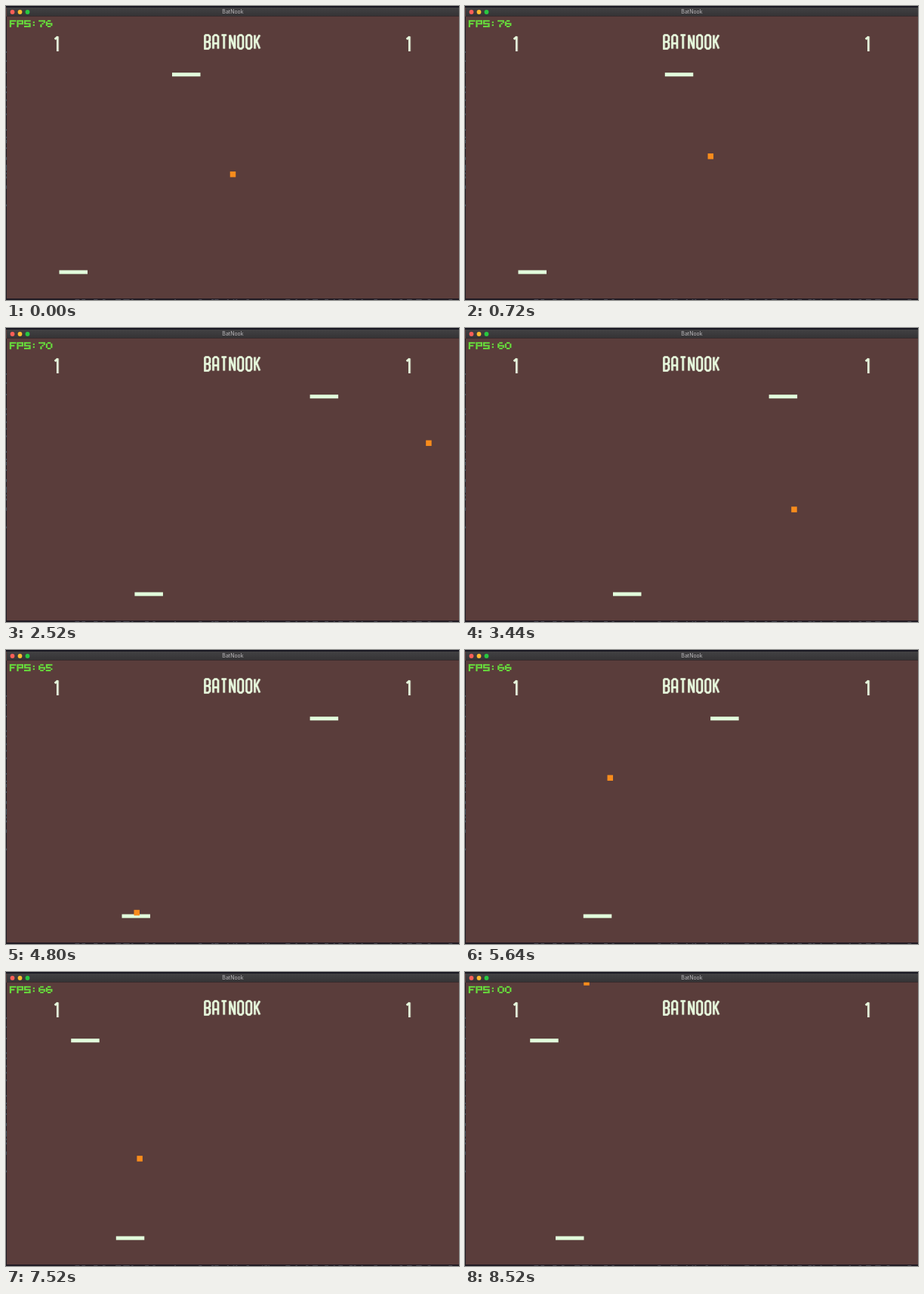
Recreate the animation shown at these times as an HTML page with a canvas. Size 600x389 px, loop 8.6 s.

```html
<!DOCTYPE html>
<html lang="en">
<head>
<meta charset="utf-8">
<title>BatNook</title>
<style>
  html, body { margin: 0; width: 100%; height: 100%; overflow: hidden; background: #5a3d3b; }
  canvas { display: block; width: 100vw; height: 100vh; }
</style>
</head>
<body>
<canvas id="stage" width="600" height="389" role="img" aria-label="BatNook, score 1 to 1"></canvas>
<script>
const ctx = document.getElementById('stage').getContext('2d');
const LOOP = 8600;
const PALE = '#e2ffdc', ORANGE = '#f88c1c', GREEN = '#69f43c', BROWN = '#5a3d3b';

// Keys: [time, value, ...]
const ballKeys = [
  [0, 300.5, 222.7], [440, 300.5, 222.7], [1320, 378.2, 148],
  [1913, 429, 97], [2520, 559.7, 152.2], [2690, 596, 168.5],
  [3440, 436.2, 240], [3640, 388, 260], [4800, 173.2, 347.8],
  [5981, 200, 97], [6480, 193.3, 203.2], [7096, 184, 346],
  [8520, 161, 14], [8600, 161, 14]
];
const topKeys = [
  [0, 220], [440, 220], [1320, 360.3], [1440, 360.3], [1800, 402.6],
  [5440, 402.6], [5960, 202.2], [6900, 202.2], [7500, 86.2]
];
const bottomKeys = [
  [0, 70.5], [2100, 70.5], [2520, 170.2], [2630, 196], [3900, 196],
  [4300, 153.5], [5600, 153.5], [5900, 177.6], [7300, 177.6], [7700, 120]
];
const fpsKeys = [[0, '76'], [960, '70'], [2800, '60'], [4560, '65'], [5480, '66'], [8160, '00']];

const pixelGlyphs = {
  F: '1111 1... 111. 1... 1...',
  P: '1111 1..1 1111 1... 1...',
  S: '1111 1... 1111 ...1 1111',
  ':': '.... .1.. .... .1.. ....',
  0: '.11. 1..1 1..1 1..1 .11.',
  5: '1111 1... 111. ...1 111.',
  6: '.11. 1... 1111 1..1 .11.',
  7: '1111 ...1 ..1. .1.. .1..'
};
const strokeGlyphs = {
  B: 'M0 0H4.4L6.4 2V7L4.4 9H0M4.4 9L6.4 11V16L4.4 18H0V0',
  A: 'M0 18V2L2 0H4.4L6.4 2V18M0 11H6.4',
  T: 'M0 0H6.4M3.2 0V18',
  N: 'M0 18V0L6.4 18V0',
  O: 'M2 0H4.4L6.4 2V16L4.4 18H2L0 16V2Z',
  K: 'M0 0V18M6.4 0L1 10M2.4 8L6.4 18',
  1: 'M0 3.4L3.6 0V19.5'
};

function sample(keys, t) {
  const i = keys.findIndex(k => k[0] > t);
  if (i < 0) return keys[keys.length - 1].slice(1);
  const a = keys[i - 1], b = keys[i];
  const u = (t - a[0]) / (b[0] - a[0]);
  return a.slice(1).map((v, n) => v + (b[n + 1] - v) * u);
}

function rect(x, y, w, h, color) {
  ctx.fillStyle = color;
  ctx.fillRect(x, y, w, h);
}

function pixelChar(ch, x, y) {
  pixelGlyphs[ch].split(' ').forEach((row, r) => {
    [...row].forEach((bit, c) => {
      if (bit === '1') rect(x + c * 2.15, y + r * 1.87, 2.15, 1.8, GREEN);
    });
  });
}

function lettering(text, x, y) {
  ctx.lineJoin = 'miter';
  ctx.miterLimit = 2;
  [...text].forEach((ch, i) => {
    const path = new Path2D(strokeGlyphs[ch]);
    for (const [shift, color] of [[0.8, '#968b80'], [0, '#e6f8dc']]) {
      ctx.save();
      ctx.translate(x + i * 11 + shift, y);
      ctx.strokeStyle = color;
      ctx.lineWidth = 2.5;
      ctx.stroke(path);
      ctx.restore();
    }
  });
}

function drawDesktopEdge() {
  rect(0, 0, 600, 2, '#191822');
  rect(0, 14, 1, 375, '#201c25');
  rect(0, 387, 600, 2, '#211b23');
  let seed = 7;
  const rand = () => (seed = seed * 16807 % 2147483647) / 2147483647;
  for (let i = 0; i < 28; i++) rect(0, 60 + rand() * 220, 1, 2, '#3d5260');
  for (let i = 0; i < 60; i++) rect(90 + rand() * 500, 388, 1 + rand() * 4, 1, '#494650');
}

function drawTitleBar() {
  const shade = ctx.createLinearGradient(0, 2, 0, 13);
  shade.addColorStop(0, '#424143');
  shade.addColorStop(1, '#353436');
  rect(1, 2, 599, 11, shade);
  rect(1, 13, 599, 0.6, '#242022');
  ['#ff5f57', '#febc2e', '#28c840'].forEach((color, i) => {
    ctx.fillStyle = color;
    ctx.beginPath();
    ctx.arc(8.5 + i * 10, 8, 2.9, 0, Math.PI * 2);
    ctx.fill();
  });
  ctx.fillStyle = '#bcbabd';
  ctx.font = '7px Inter, Roboto, sans-serif';
  ctx.textAlign = 'center';
  ctx.textBaseline = 'middle';
  ctx.fillText('BatNook', 300.5, 8.2);
}

function drawFps(t) {
  const value = fpsKeys.filter(k => k[0] <= t).pop()[1];
  [...('FPS:' + value)].forEach((ch, i) => pixelChar(ch, 4.8 + i * 9.6, 18.8));
}

function draw(t) {
  rect(0, 0, 600, 389, BROWN);
  drawDesktopEdge();
  lettering('BATNOOK', 263.4, 38.4);
  lettering('1', 64.6, 40.6);
  lettering('1', 530.6, 40.6);
  drawFps(t);

  rect(sample(topKeys, t)[0], 88.2, 37.5, 5, PALE);
  rect(sample(bottomKeys, t)[0], 349.6, 37.5, 5, PALE);
  const [x, y] = sample(ballKeys, t);
  rect(x - 3.75, y - 3.75, 7.5, 7.5, ORANGE);
  drawTitleBar();
}

const start = performance.now();
function tick() {
  draw((performance.now() - start) % LOOP);
  requestAnimationFrame(tick);
}
tick();
</script>
</body>
</html>
```
